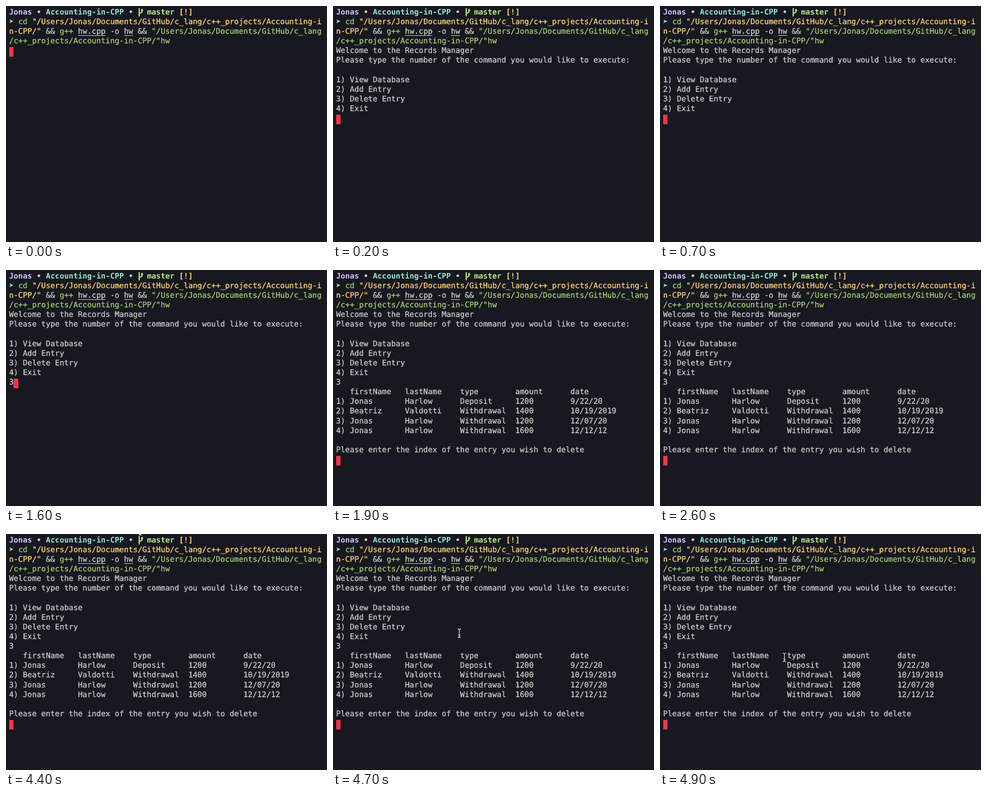
Write an HTML page that moves like this. It is 600x443 px and loops after 5 s.

```html
<!DOCTYPE html>
<html lang="en">
<head>
<meta charset="utf-8">
<title>Records Manager</title>
<style>
  html, body { margin: 0; width: 100%; height: 100%; overflow: hidden; background: #171820; }
  #stage { position: relative; width: 600px; height: 443px; overflow: hidden; }
  pre {
    position: absolute; left: 5.7px; top: 2.7px; margin: 0;
    font: 14.27px/18.13px "DejaVu Sans Mono", monospace;
    text-rendering: geometricPrecision; font-variant-ligatures: none;
    -webkit-text-stroke: .3px currentColor;
    color: #cbccc6;
  }
  b { -webkit-text-stroke-width: 0; }
  .user { color: #d4bfff; }
  .mint { color: #95e6cb; }
  .lime { color: #bae67e; }
  .gold { color: #ffd580; }
  .green { color: #a6cc70; }
  .path { color: #ffd173; }
  u { text-underline-offset: 3px; text-decoration-thickness: 1px; text-decoration-skip-ink: none; }
  #caret { position: absolute; width: 8.6px; height: 18px; background: #ff3347; }
  svg { position: absolute; left: 0; top: 0; fill: none; }
</style>
</head>
<body>
<div id="stage">
<pre id="screen"></pre>
<div id="caret"></div>
<svg width="600" height="443">
  <path d="M249 4V19.5M254.3 7V9.5Q254.3 12 251.5 13T249 16" stroke="#bae67e" stroke-width="2.2"/>
  <path d="M251.6 9L254.3 4.5L257 9Z" fill="#bae67e"/>
  <path id="pointer" d="M-3-8Q0-8 0-5.5V5.5Q0 8-3 8M3-8Q0-8 0-5.5M0 5.5Q0 8 3 8M-2 3.5H2" stroke="#f2f2f2" stroke-width="1.2"/>
</svg>
</div>
<script>
const LOOP = 5000, CELL = 8.591, ROW = 18.13;
const MENU_AT = 200, TYPE_AT = 1600, TABLE_AT = 1900, POINTER_AT = 4400;

const screen = document.getElementById('screen');
const caret = document.getElementById('caret');
const pointer = document.getElementById('pointer');

const prompt = `<b><span class="user">Jonas</span> • <span class="mint">Accounting-in-CPP</span> •   <span class="lime">master</span> <span class="gold">[!]</span></b>
<span class="mint">➤</span> <span class="green">cd</span> <span class="path">"/Users/Jonas/Documents/GitHub/c_lang/c++_projects/Accounting-i
n-CPP/"</span> &amp;&amp; <span class="green">g++</span> <u>hw.cpp</u> -o <u>hw</u> &amp;&amp; <span class="green">"/Users/Jonas/Documents/GitHub/c_lang
/c++_projects/Accounting-in-CPP/"hw</span>
`;

const menu = `Welcome to the Records Manager
Please type the number of the command you would like to execute:

1) View Database
2) Add Entry
3) Delete Entry
4) Exit
`;

const records = [
  ['firstName', 'lastName', 'type', 'amount', 'date'],
  ['Jonas', 'Harlow', 'Deposit', '1200', '9/22/20'],
  ['Beatriz', 'Valdotti', 'Withdrawal', '1400', '10/19/2019'],
  ['Jonas', 'Harlow', 'Withdrawal', '1200', '12/07/20'],
  ['Jonas', 'Harlow', 'Withdrawal', '1600', '12/12/12'],
];
const table = records.map((record, i) =>
  (i ? i + ') ' : '   ') + record.map(field => field.padEnd(12)).join('')).join('\n');
const question = '\n\nPlease enter the index of the entry you wish to delete\n';

const stages = [
  { at: 0, text: prompt, row: 4, col: 0 },
  { at: MENU_AT, text: prompt + menu, row: 11, col: 0 },
  { at: TYPE_AT, text: prompt + menu + '3', row: 11, col: 1 },
  { at: TABLE_AT, text: prompt + menu + '3\n' + table + question, row: 19, col: 0 },
];
let shown;

function draw(time) {
  const stage = stages.findLast(s => time >= s.at);
  if (stage !== shown) {
    shown = stage;
    screen.innerHTML = stage.text;
    caret.style.left = 5.7 + stage.col * CELL + 'px';
    caret.style.top = 4.3 + stage.row * ROW + 'px';
  }

  // The pointer enters from the top edge in six 100 ms steps.
  const step = Math.floor((time - POINTER_AT) / 100);
  const eased = Math.sin(Math.min(step / 5, 1) * Math.PI / 2);
  pointer.style.display = step < 0 ? 'none' : '';
  pointer.setAttribute('transform', `translate(${251 - 18.5 * eased} ${-6 + 237.5 * eased})`);
}

function tick() {
  draw(performance.now() % LOOP);
  requestAnimationFrame(tick);
}
tick();
</script>
</body>
</html>
```
